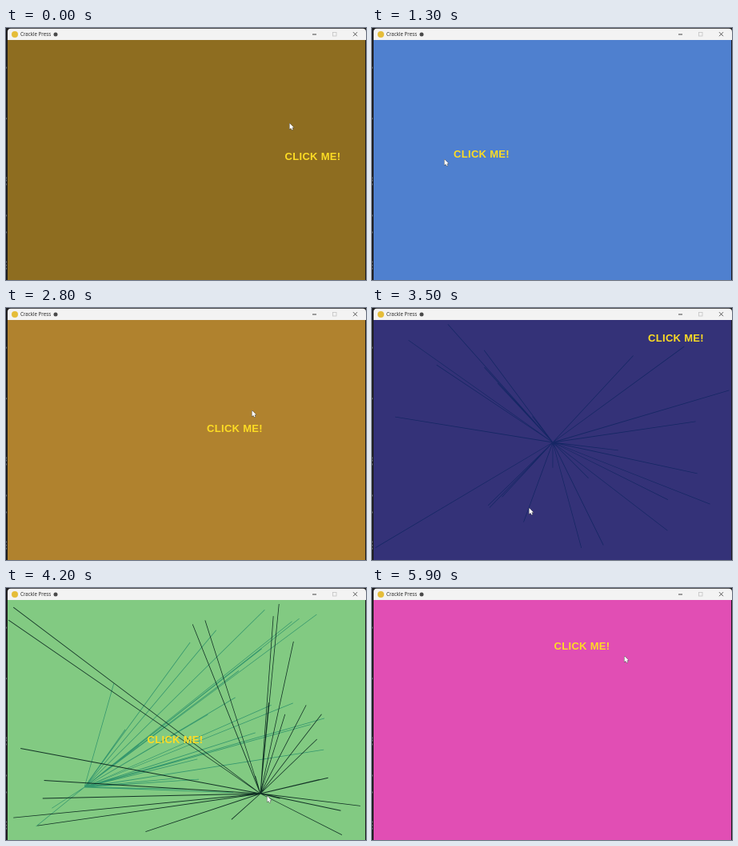
Write an HTML page with a canvas that moves like this. It is 450x315 px and loops after 6000 ms.

```html
<!DOCTYPE html>
<html lang="en">
<head>
<meta charset="utf-8">
<style>
html, body { margin: 0; width: 100%; height: 100%; overflow: hidden; background: #1c1c1e; }
canvas { display: block; }
</style>
</head>
<body>
<canvas id="stage" width="450" height="315"></canvas>
<script>
const ctx = document.getElementById('stage').getContext('2d');
const W = 450, H = 315, BAR = 15;
const LOOP = 6000, STEP = 100, FADE = 400, RAYS = 26;
const EDGE = '#1c1c1e';

// Each click on the label moves it and changes the background
const scenes = [
  { at: 0, bg: '#8e6d20', x: 383.5, y: 161 },
  { at: 600, bg: '#4f80cf', x: 137, y: 158 },
  { at: 1500, bg: '#7a5f9a', x: 330, y: 230 },
  { at: 2200, bg: '#b0822e', x: 286, y: 151 },
  { at: 2900, bg: '#74526a', x: 226, y: 168 },
  { at: 3200, bg: '#343278', x: 380, y: 38 },
  { at: 3700, bg: '#5f8a90', x: 98, y: 249 },
  { at: 3900, bg: '#5f9a80', x: 318, y: 257 },
  { at: 4100, bg: '#82ca82', x: 211.5, y: 190 },
  { at: 4300, bg: '#3e5c71', x: 94, y: 296 },
  { at: 5100, bg: '#e14eb4', x: 262.5, y: 73 }
];

function seeded(seed) {
  return () => (seed = seed * 16807 % 2147483647) / 2147483647;
}

// A burst sends rays from the clicked label to random points of the window
const bursts = scenes.slice(1).map(({ at }, i) => {
  const random = seeded(at * 7919);
  const ends = Array.from({ length: RAYS }, () => [random() * W, BAR + random() * (H - BAR)]);
  return { at, x: scenes[i].x, y: scenes[i].y, ends };
});

// The pointer visits every click and a few places between them
const hovers = [
  { at: 0, x: 354, y: 118 },
  { at: 1300, x: 90, y: 163 },
  { at: 2800, x: 307, y: 127 },
  { at: 3500, x: 196, y: 249 },
  { at: 4200, x: 326, y: 259 },
  { at: 4700, x: 170, y: 261 },
  { at: 5900, x: 315, y: 84 },
  { at: LOOP, x: 354, y: 118 }
];
const path = [...bursts, ...hovers].sort((a, b) => a.at - b.at);

function pointerAt(t) {
  const i = path.findIndex(p => p.at > t);
  const from = path[i - 1], to = path[i];
  const k = (t - from.at) / (to.at - from.at), ease = k * k * (3 - 2 * k);
  return [from.x + (to.x - from.x) * ease, from.y + (to.y - from.y) * ease];
}

function box(color, x, y, w, h) {
  ctx.fillStyle = color;
  ctx.fillRect(x, y, w, h);
}

function dot(color, x, y, r) {
  ctx.fillStyle = color;
  ctx.beginPath();
  ctx.arc(x, y, r, 0, Math.PI * 2);
  ctx.fill();
}

// Rays start black, turn to a teal shade of the background and vanish
function drawBurst({ at, x, y, ends }, t) {
  const k = (t - at) / FADE;
  if (k < 0 || k >= 1) return;
  ctx.globalCompositeOperation = 'multiply';
  ctx.strokeStyle = `rgb(${135 * k} ${255 * k} ${285 * k})`;
  ctx.lineWidth = 0.8;
  ctx.beginPath();
  for (const end of ends) {
    ctx.moveTo(x, y);
    ctx.lineTo(...end);
  }
  ctx.stroke();
  ctx.globalCompositeOperation = 'source-over';
}

function drawLabel({ x, y }) {
  ctx.font = 'bold 13px "Liberation Sans", Arial, sans-serif';
  ctx.letterSpacing = '0.3px';
  ctx.textAlign = 'center';
  ctx.fillStyle = '#fddc24';
  ctx.fillText('CLICK ME!', x, y + 4.2);
  ctx.letterSpacing = '0px';
}

const arrow = new Path2D('M0.5 1V8.6L2.2 7.1L3.5 9.6L4.7 9L3.5 6.6H5.8Z');

function drawPointer(x, y) {
  ctx.save();
  ctx.translate(x, y);
  ctx.fillStyle = '#fff';
  ctx.strokeStyle = '#333';
  ctx.lineWidth = 0.8;
  ctx.stroke(arrow);
  ctx.fill(arrow);
  ctx.restore();
}

function drawWindow() {
  box(EDGE, 0, 0, 2, H);
  box(EDGE, W - 1, 0, 1, H);
  const random = seeded(4242);
  for (let i = 0; i < 10; i++) box('#62666c', 0, 40 + random() * 260, 1, 2);

  box(EDGE, 0, 0, W, BAR);
  ctx.fillStyle = '#f3f3f3';
  ctx.beginPath();
  ctx.roundRect(2, 0.7, W - 2, BAR - 0.7, [4, 4, 0, 0]);
  ctx.fill();

  dot('#e5bd39', 11, 8, 4);
  ctx.font = '6.2px "Open Sans", sans-serif';
  ctx.textAlign = 'left';
  ctx.fillStyle = '#222';
  ctx.fillText('Crackle Press', 18, 10.2);
  dot('#4a4a4a', 62, 8, 2.5);

  box('#444', 383, 7.5, 5, 1);
  ctx.lineWidth = 0.8;
  ctx.strokeStyle = '#c4c4c4';
  ctx.strokeRect(408.5, 5.5, 4.5, 4.5);
  ctx.strokeStyle = '#333';
  ctx.stroke(new Path2D('M434 5.2L439 10.2M439 5.2L434 10.2'));
}

function draw(now) {
  const t = Math.floor(now % LOOP / STEP) * STEP;
  const scene = scenes.findLast(s => s.at <= t);
  box(scene.bg, 0, 0, W, H);
  for (const b of bursts) drawBurst(b, t);
  drawLabel(scene);
  drawWindow();
  drawPointer(...pointerAt(t));
  requestAnimationFrame(draw);
}

requestAnimationFrame(draw);
</script>
</body>
</html>
```
